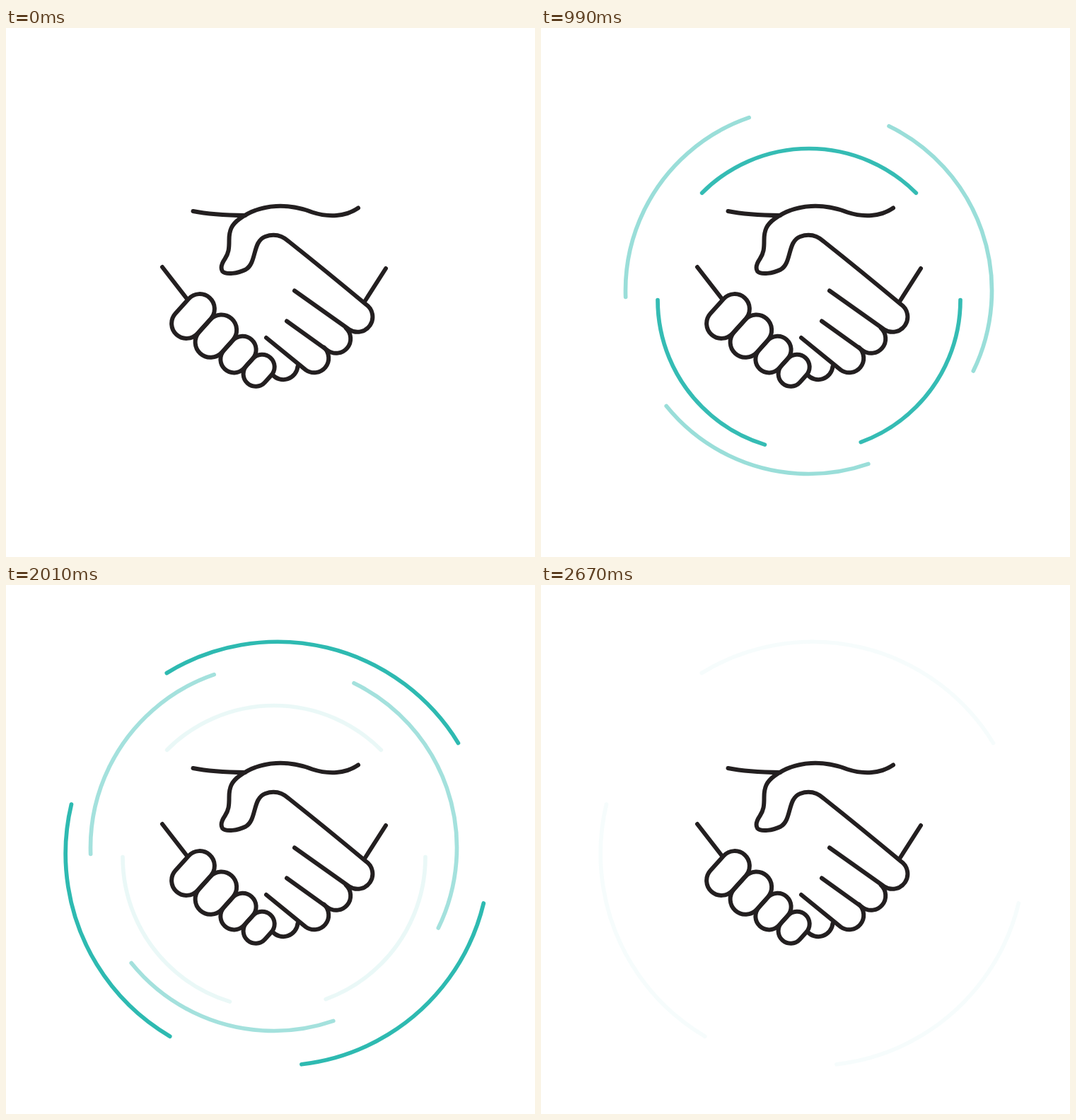
Write an HTML page that moves like this. It is 748 px wide and 748 px high and loops after 2.73 s.

```html
<!DOCTYPE html>
<html lang="en">
<head>
<meta charset="utf-8">
<title>Handshake</title>
<style>
html, body { margin: 0; width: 100%; height: 100%; overflow: hidden; background: #fff; }
svg { display: block; width: 100vw; height: 100vh; }
</style>
</head>
<body>
<svg viewBox="0 0 748 748" fill="none" stroke-linecap="round" stroke-linejoin="round">
  <g id="rings" stroke="#2bb9b0" stroke-width="5.7" stroke-dasharray="90 45 70 37 73 45"></g>
  <g id="hands" stroke="#231f20" stroke-width="6">
    <!-- sleeves and wrists -->
    <path d="M264.5 259C284 263 312 264.8 338 265M221 338L255.5 382.5M537 340L507 387"/>
    <!-- thumb and index finger -->
    <path d="M498 254.5C480 267 456 268 433 260.5C402 248.5 362 246.5 330 270C319 278 315.5 286 315.5 300C315.5 312 315 318 309.5 326.5C304 334.5 303.5 340 306 344C311 349.5 328 347 339 341.5C355 332 348 302 366.5 295C379 290.5 390 293 400 302C434 329 472 360 508.9 390.8a21.3 21.3 0 0 1 -23.7 35.4L408 371.5"/>
    <!-- other fingers: round tip, then crease -->
    <path d="M480.7 424.3a20.5 20.5 0 0 1 -26 31.6L397 414.5"/>
    <path d="M449.7 451.8a20.5 20.5 0 0 1 -26 31.6L368 438"/>
    <path d="M412.5 478.5a20.5 20.5 0 0 1 -36 11.5"/>
  </g>
</svg>
<script>
const LOOP = 2730;
const NS = 'http://www.w3.org/2000/svg';

function add(id, tag, attrs) {
  const el = document.createElementNS(NS, tag);
  for (const k in attrs) el.setAttribute(k, attrs[k]);
  return document.getElementById(id).appendChild(el);
}

// Left fingers: tilted capsules, each touching the one before
let x = 264.5, y = 407.5, last = 0;
[21, 21.5, 19, 17.5].forEach((r, i) => {
  if (i) {
    const angle = (42.6 - 1.6 * i) * Math.PI / 180;
    x += (last + r + 0.4) * Math.cos(angle);
    y += (last + r + 0.4) * Math.sin(angle);
  }
  last = r;
  const half = r + 14 - 2.4 * i;
  add('hands', 'rect', {
    x: -half, y: -r, width: 2 * half, height: 2 * r, rx: r,
    transform: `translate(${x} ${y}) rotate(132)`
  });
});

// All rings share one dash pattern in degrees, each turned by its own angle
const rings = [
  { cx: 379, cy: 384.5, r: 214, turn: 225 },
  { cx: 378.5, cy: 371.5, r: 259, turn: 296 },
  { cx: 383.9, cy: 380, r: 299.7, turn: 238.5 }
].map(({ cx, cy, r, turn }) => add('rings', 'circle', {
  cx, cy, r, pathLength: 360, transform: `rotate(${turn} ${cx} ${cy})`
}));

const clamp = v => Math.max(0, Math.min(1, v));

// Each ring fades in after the one inside it, then fades out faster
function alpha(i, t) {
  const start = 585 * i, peak = 930 + 540 * i, end = 2125 + 288 * i;
  return Math.min(clamp((t - start) / 855), clamp((end - t) / (end - peak)));
}

function draw(time) {
  const t = time % LOOP;
  const step = t < 1230 ? 30 : 60;
  const held = Math.floor((t - 30) / step) * step + 30;
  rings.forEach((el, i) => el.setAttribute('opacity', alpha(i, held)));
}

let t0;
function tick(now) {
  t0 ??= now;
  draw(Math.max(0, now - t0));
  requestAnimationFrame(tick);
}
draw(0);
requestAnimationFrame(tick);
</script>
</body>
</html>
```
